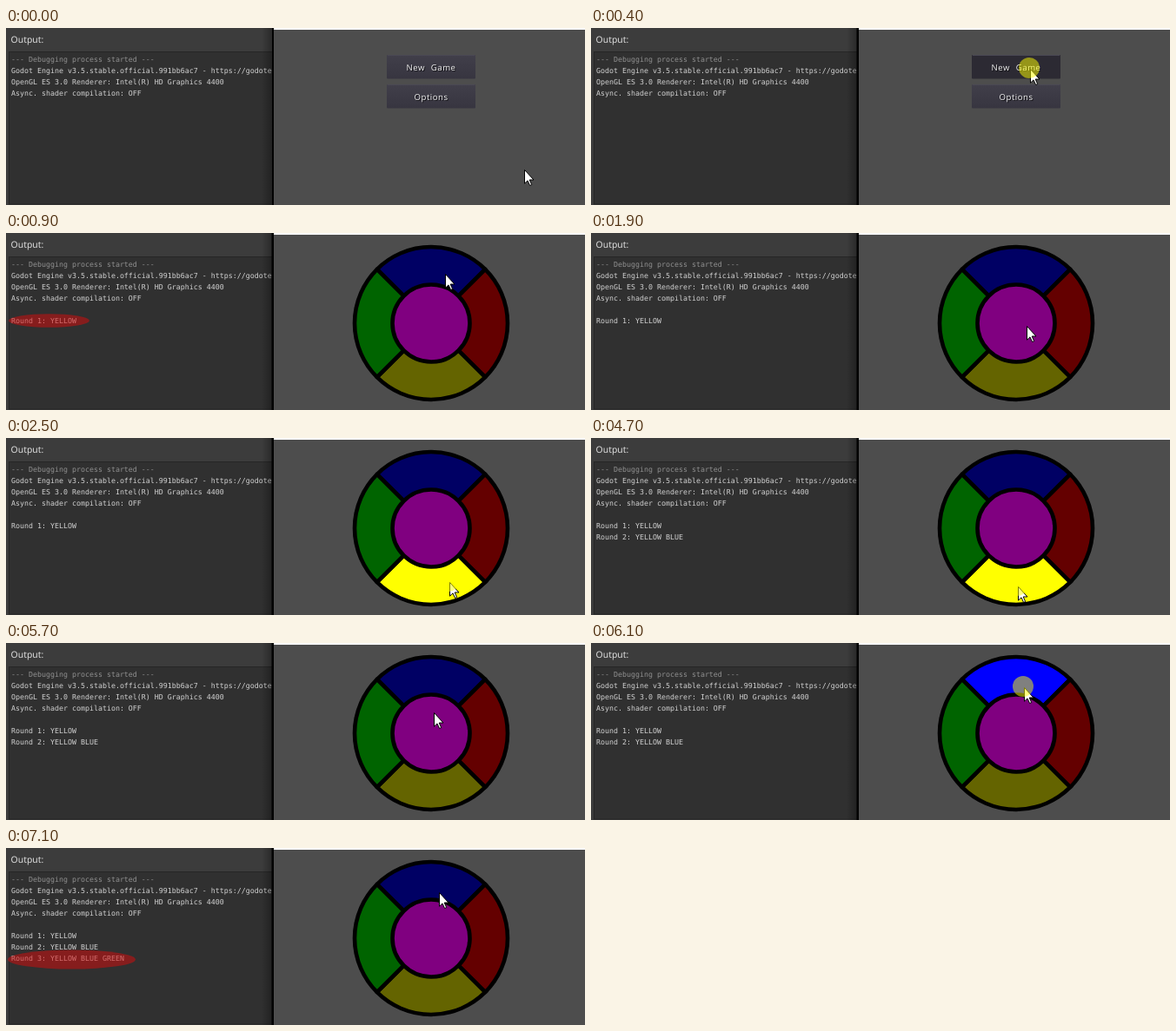
An HTML page for the animation above (8000 ms loop, 666 by 204 pixels).

```html
<!DOCTYPE html>
<html lang="en">
<head>
<meta charset="utf-8">
<title>Colour sequence game</title>
<style>
  html, body { margin: 0; width: 100%; height: 100%; overflow: hidden; background: #4d4d4d; }
  svg { display: block; text-rendering: geometricPrecision; }
  .log { font: 8.306px "DejaVu Sans Mono", monospace; fill: #d2d2d2; white-space: pre; }
  .title { font: 10.4px "Noto Sans", sans-serif; fill: #dedede; }
  .label { font: 9.6px "Open Sans", sans-serif; letter-spacing: .5px; word-spacing: 4px; text-anchor: middle; }
  .wheel { stroke: #000; stroke-width: 4.6; stroke-linejoin: round; }
</style>
</head>
<body>
<svg id="stage" width="666" height="204" viewBox="0 0 666 204">
  <defs>
    <linearGradient id="shade">
      <stop offset="0" stop-opacity="0"/>
      <stop offset="1" stop-opacity=".3"/>
    </linearGradient>
    <linearGradient id="face" x2="0" y2="1">
      <stop offset="0" stop-color="#413f4a"/>
      <stop offset="1" stop-color="#373540"/>
    </linearGradient>
    <clipPath id="editor"><path d="M0 0H306V204H0Z"/></clipPath>
  </defs>

  <g clip-path="url(#editor)">
    <rect width="306" height="204" fill="#3c3c3c"/>
    <rect x="3.5" y="27.5" width="310" height="175.5" fill="#303030" stroke="#262626"/>
    <text class="title" x="5.6" y="17">Output:</text>
    <g id="log" class="log"></g>
    <ellipse id="mark" fill="rgba(220,10,10,.5)"/>
    <rect x="294" width="12" height="204" fill="url(#shade)"/>
  </g>

  <rect x="306" width="360" height="204" fill="#4d4d4d"/>
  <rect x="308" width="358" height="2" fill="#fff"/>
  <rect id="edge" y="0" height="204"/>

  <g id="menu"></g>
  <g id="game"></g>

  <path id="cursor" fill="#fff" stroke="#000" stroke-width="1"
    d="M.5 .5V16.2L4 12.9L6.6 18.5L8.7 17.6L6.2 12H11Z"/>
  <circle id="click" r="12" fill="#ff0" fill-opacity=".5"/>
</svg>
<script>
const LOOP = 8000;
const $ = id => document.getElementById(id);

function add(parent, tag, attrs, text) {
  const el = document.createElementNS("http://www.w3.org/2000/svg", tag);
  for (const key in attrs) el.setAttribute(key, attrs[key]);
  if (text) el.textContent = text;
  return parent.appendChild(el);
}
const show = (el, on) => { el.style.display = on ? "" : "none"; };

// Output panel
const logLine = (row, text, fill) =>
  add($("log"), "text", { x: 6, y: 39 + row * 13, ...(fill && { style: "fill:" + fill }) }, text);
logLine(0, "--- Debugging process started ---", "#919191");
logLine(1, "Godot Engine v3.5.stable.official.991bb6ac7 - https://godotengine.org");
logLine(2, "OpenGL ES 3.0 Renderer: Intel(R) HD Graphics 4400");
logLine(3, "Async. shader compilation: OFF");
const rounds = ["YELLOW", "YELLOW BLUE", "YELLOW BLUE GREEN"]
  .map((names, i) => logLine(5 + i, `Round ${i + 1}: ${names}`));
const marks = [[49.5, 101, 46.5, 7.8], [59, 114.5, 57, 12], [75.5, 128.5, 73.5, 11]];

// Menu
function button(y, text) {
  const face = add($("menu"), "rect", { x: 438, y, width: 102, height: 27.5, rx: 1, fill: "url(#face)" });
  add($("menu"), "path", { d: `M439 ${y + .5}H539`, stroke: "#4a4854" });
  add($("menu"), "text", { class: "label", x: 490, y: y + 19, fill: "#000", opacity: .75 }, text);
  add($("menu"), "text", { class: "label", x: 489, y: y + 18, fill: "#f4f4f4" }, text);
  return face;
}
const newGame = button(31, "New Game");
button(65, "Options");

// Wheel: one quarter per colour, turned into place
const CX = 489, CY = 104, R = 88, c = R * Math.SQRT1_2;
const dim = { blue: "#000064", red: "#640000", yellow: "#646400", green: "#006400" };
const lit = { blue: "#0000ff", yellow: "#ffff00" };
const parts = {};
Object.keys(dim).forEach((name, i) => {
  parts[name] = add($("game"), "path", {
    class: "wheel",
    d: `M0 0L${-c} ${-c}A${R} ${R} 0 0 1 ${c} ${-c}Z`,
    transform: `translate(${CX} ${CY}) rotate(${i * 90})`
  });
});
add($("game"), "circle", { class: "wheel", cx: CX, cy: CY, r: 44.5, fill: "#800080" });

// time, cursor x, cursor y, rounds logged, round marked, pressed part
const steps = [
  [0, 596, 163, 0, 0, ""],
  [200, 528, 69, 0, 0, ""],
  [400, 505, 47, 0, 0, "start"],
  [900, 505, 47, 1, 1, ""],
  [1900, 501, 107, 1, 0, ""],
  [2100, 498, 141, 1, 0, ""],
  [2300, 510, 166, 1, 0, ""],
  [2500, 510, 166, 1, 0, "yellow"],
  [3500, 510, 166, 2, 2, ""],
  [4500, 491, 171, 2, 0, ""],
  [4700, 491, 171, 2, 0, "yellow"],
  [5700, 492, 80, 2, 0, ""],
  [5900, 498, 51, 2, 0, ""],
  [6100, 498, 51, 2, 0, "blue"],
  [7100, 498, 51, 3, 3, ""]
];

function draw([time, x, y, logged, marked, pressed]) {
  const focused = time >= 400;
  $("edge").setAttribute("x", focused ? 305.5 : 306);
  $("edge").setAttribute("width", focused ? 2.5 : 2);
  show($("menu"), !logged);
  show($("game"), logged);
  newGame.setAttribute("fill", pressed === "start" ? "#2c2a33" : "url(#face)");

  rounds.forEach((line, i) => show(line, i < logged));
  show($("mark"), marked);
  if (marked) ["cx", "cy", "rx", "ry"].forEach((key, i) => $("mark").setAttribute(key, marks[marked - 1][i]));

  for (const name in parts) parts[name].setAttribute("fill", (name === pressed ? lit : dim)[name]);

  $("cursor").setAttribute("transform", `translate(${x} ${y})`);
  show($("click"), pressed);
  $("click").setAttribute("cx", x - 1);
  $("click").setAttribute("cy", y - 1);
}

let current;
const start = performance.now();
function tick() {
  const t = (performance.now() - start) % LOOP;
  const step = steps.findLast(s => s[0] <= t);
  if (step !== current) draw(current = step);
  requestAnimationFrame(tick);
}
tick();
</script>
</body>
</html>
```
